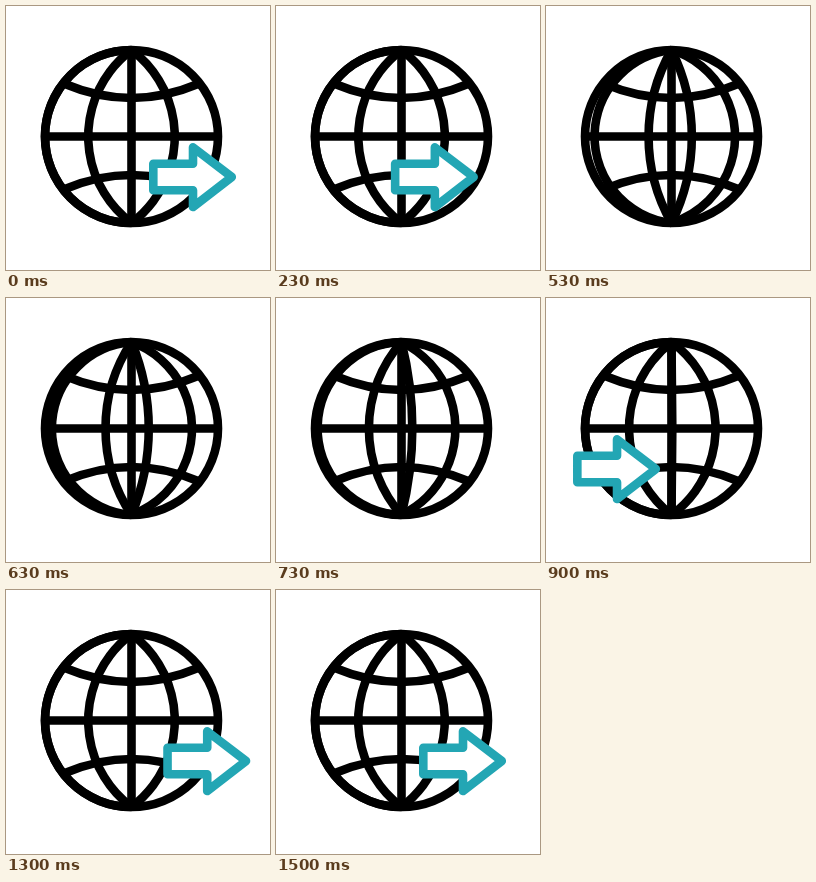
An HTML page with a canvas for the animation above (1.67 s loop, 264 by 264 pixels).

```html
<!DOCTYPE html>
<html lang="en">
<head>
<meta charset="utf-8">
<title>Globe and arrow</title>
<style>
  html, body { margin: 0; width: 100%; height: 100%; overflow: hidden; background: #fff; }
  canvas { display: block; width: 100vw; height: 100vh; }
</style>
</head>
<body>
<canvas id="stage" width="264" height="264"></canvas>
<script>
const ctx = document.getElementById('stage').getContext('2d');
const LOOP = 1670;
const CX = 125.5, CY = 130.5, RADIUS = 86.5;
const SLOT = RADIUS / 2;
const ARROW = [[147.3, 157.8], [187, 157.8], [187, 141.3], [225.8, 171], [187, 201], [187, 184.2], [147.3, 184.2]];

// Time (ms) and horizontal offset; the arrow leaves right and re-enters left at 530 ms.
const EXIT = [[0, 0], [268, -29.5], [530, 150]];
const ENTRY = [[530, -312], [1190, 20], [1500, 0]];

// Time (ms) and turn in meridian slots: a quick spin, then settling back.
const SPIN = [[230, 0], [530, 4.47], [950, 4]];

const lerp = (a, b, k) => a + (b - a) * k;

function ease(t, start, end) {
  const u = Math.min(1, Math.max(0, (t - start) / (end - start)));
  return u * u * (3 - 2 * u);
}

function follow(keys, t) {
  const i = t < keys[1][0] ? 0 : 1;
  const [from, to] = [keys[i], keys[i + 1]];
  return lerp(from[1], to[1], ease(t, from[0], to[0]));
}

function stroke(trace) {
  ctx.beginPath();
  trace();
  ctx.stroke();
}

function line(x1, y1, x2, y2) {
  stroke(() => { ctx.moveTo(x1, y1); ctx.lineTo(x2, y2); });
}

// Circular arc through both poles that bulges sideways by x.
function meridian(x) {
  const bulge = Math.abs(x);
  if (bulge < 0.5) return;
  const r = (RADIUS ** 2 + bulge ** 2) / (2 * bulge);
  const half = Math.asin(Math.min(1, RADIUS / r));
  const middle = x < 0 ? Math.PI : 0;
  const center = CX + x - Math.sign(x) * r;
  stroke(() => ctx.arc(center, CY, r, middle - half, middle + half));
}

function latitude(edgeY, controlY) {
  stroke(() => {
    ctx.moveTo(CX - 66.5, edgeY);
    ctx.quadraticCurveTo(CX, controlY, CX + 66.5, edgeY);
  });
}

function drawGlobe(t) {
  ctx.strokeStyle = '#000';
  ctx.lineWidth = 8.6;
  stroke(() => ctx.arc(CX, CY, RADIUS, 0, Math.PI * 2));
  line(CX - RADIUS, CY, CX + RADIUS, CY);
  line(CX, CY - RADIUS, CX, CY + RADIUS);
  latitude(78, 106);
  latitude(183, 155);

  // A new meridian peels slowly off the left rim; the others move evenly.
  const turn = follow(SPIN, t) % 1;
  meridian(-RADIUS + SLOT * turn * turn);
  for (let i = -1; i <= 1; i++) meridian(SLOT * (i + turn));
}

function drawArrow(t) {
  const offset = follow(t < 530 ? EXIT : ENTRY, t);
  ctx.beginPath();
  for (const [x, y] of ARROW) ctx.lineTo(x + offset, y);
  ctx.closePath();
  ctx.fillStyle = '#fff';
  ctx.strokeStyle = '#23a6b4';
  ctx.lineWidth = 8.6;
  ctx.lineJoin = 'round';
  ctx.fill();
  ctx.stroke();
}

function draw() {
  // The motion advances at 30 steps per second.
  const step = Math.floor((performance.now() % LOOP + 5) * 0.03);
  const t = step * 1000 / 30;
  ctx.fillStyle = '#fff';
  ctx.fillRect(0, 0, 264, 264);
  drawGlobe(t);
  drawArrow(t);
  requestAnimationFrame(draw);
}

draw();
</script>
</body>
</html>
```
